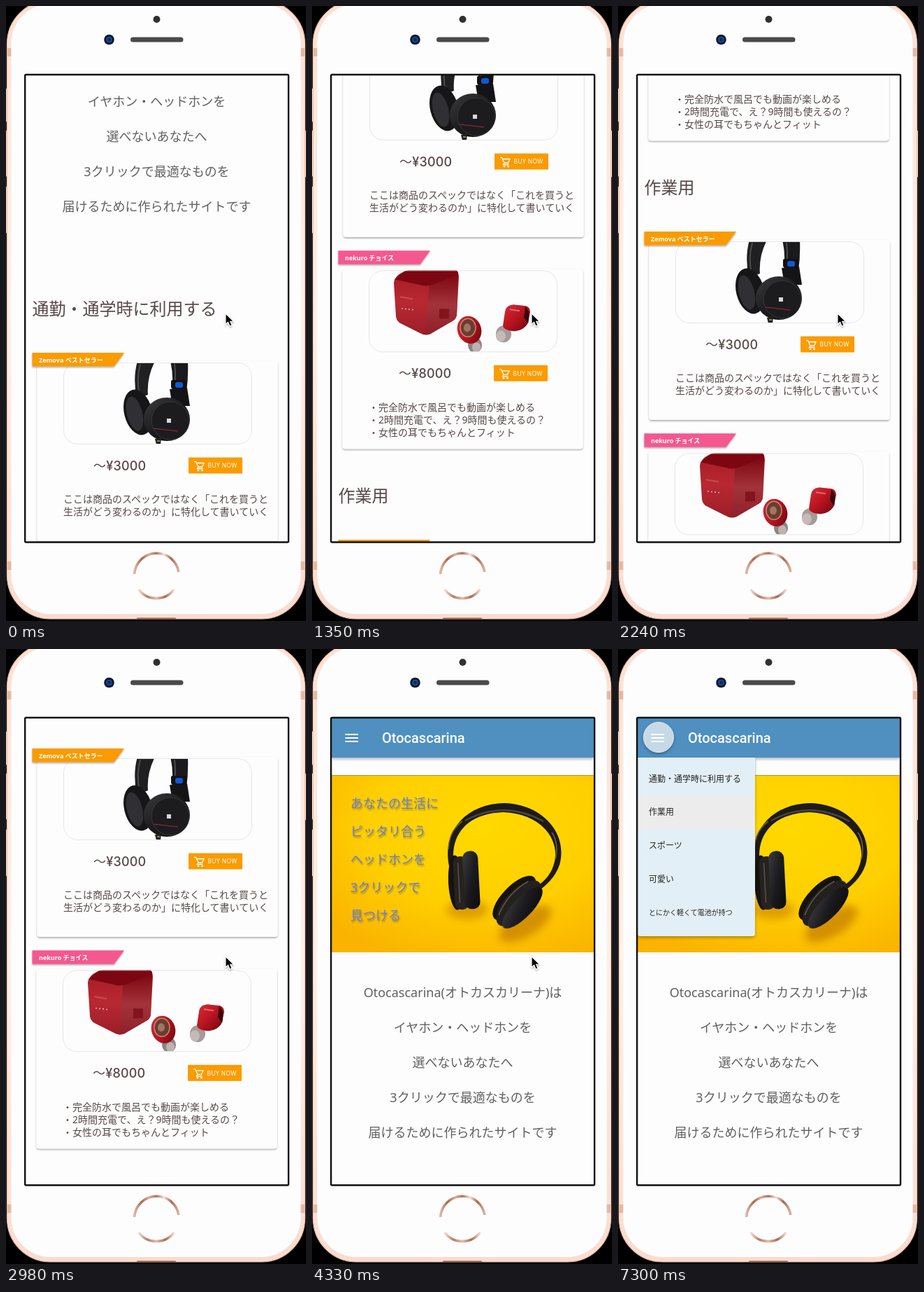
Recreate the animation shown at these times as an HTML page. Size 429 by 878 pixels, loop 8 s.

```html
<!DOCTYPE html>
<html lang="ja">
<head>
<meta charset="utf-8">
<title>Headphone shop on a phone</title>
<style>
  html, body { margin: 0; width: 100%; height: 100%; overflow: hidden; background: #000; }
  svg { display: block; width: 429px; height: 878px; }
  text { font-family: "Noto Sans", "Noto Sans CJK JP", "Noto Sans CJK", sans-serif; white-space: pre; }
  .price { font-family: Inter, "Noto Sans CJK JP", "Noto Sans CJK", sans-serif; font-weight: 500; }
  .title { font-family: Roboto, sans-serif; font-weight: 500; }
</style>
</head>
<body>
<svg id="stage" viewBox="0 0 429 878" xmlns="http://www.w3.org/2000/svg"></svg>
<script>
const LOOP = 8000;
const ORANGE = '#fa9b00', PINK = '#f4588f', INK = '#574848';

// Hard steps: [start ms, value...]
const SCROLL = [
  [0, 404], [150, 440], [300, 510], [450, 585], [600, 645], [750, 692], [900, 728], [1050, 750],
  [1350, 838], [1500, 990], [1650, 1110], [1790, 1180],
  [2240, 1278], [2390, 1372], [2530, 1414], [2980, 1458],
  [4030, 1150], [4180, 350], [4330, 0]
];
const POINTER = [
  [0, 314, 439], [4930, 297, 410], [5080, 240, 310], [5230, 170, 195], [5380, 129, 126],
  [5530, 140, 137], [5820, 132, 134], [5970, 105, 129], [6120, 72, 125], [6260, 56, 124]
];
const MENU_START = 7150, MENU_OPEN = 7300;

const text = (x, cy, size, str, attrs = '') =>
  `<text x="${x}" y="${cy + size * 0.38}" font-size="${size}" ${attrs}>${str}</text>`;
const path = (d, attrs) => `<path d="${d}" ${attrs}/>`;
const rect = (x, y, w, h, attrs) => `<rect x="${x}" y="${y}" width="${w}" height="${h}" ${attrs}/>`;
const oval = (x, y, rx, ry, attrs) => `<ellipse cx="${x}" cy="${y}" rx="${rx}" ry="${ry}" ${attrs}/>`;
const group = (body, attrs) => `<g ${attrs}>${body}</g>`;
const gradient = (id, stops, attrs = '') =>
  `<linearGradient id="${id}" ${attrs}>${stops.map((c, i) =>
    `<stop offset="${i / (stops.length - 1)}" stop-color="${c}"/>`).join('')}</linearGradient>`;
const shadow = (id, dx, dy, blur, opacity) =>
  `<filter id="${id}" x="-20%" y="-30%" width="140%" height="170%">
    <feDropShadow dx="${dx}" dy="${dy}" stdDeviation="${blur}" flood-opacity="${opacity}"/></filter>`;

const defs = `<defs>
  <clipPath id="screen">${rect(28, 99, 375, 666, '')}</clipPath>
  <clipPath id="thumb">${rect(82, 0, 269, 116, 'rx="20"')}</clipPath>
  <radialGradient id="yellow" cx=".58" cy=".3" r=".8">
    <stop offset="0" stop-color="#ffd900"/><stop offset=".55" stop-color="#ffcf00"/>
    <stop offset="1" stop-color="#f9b300"/></radialGradient>
  ${gradient('rim', ['#fbe0d3', '#fff0e8', '#f9dccf'], 'x2="0" y2="1"')}
  ${gradient('copper', ['#e0b9a5', '#a9694f', '#d9ae99', '#b0755b', '#f4e3da', '#a9694f', '#dcb29e'])}
  ${gradient('copper2', ['#f3e0d6', '#b57b60', '#e2bfae', '#a9694f', '#f3e0d6'])}
  ${gradient('cup', ['#3c3c3e', '#1b1b1d', '#0b0b0c'], 'x2="1" y2="1"')}
  ${gradient('redFace', ['#a01a24', '#b92832', '#9c1e28'], 'x2="0" y2="1"')}
  ${gradient('redSide', ['#7d0712', '#a3333a', '#8f2029'], 'x2="0" y2="1"')}
  ${gradient('redBud', ['#d3303a', '#b8131f', '#650810'], 'x2="1" y2="1"')}
  ${shadow('lift', 0, 1.5, 1, 0.35)}
  ${shadow('glow', 0, 2, 2, 0.32)}
  ${shadow('type', 1, 2, 1, 0.35)}
  <filter id="blur" x="-50%" y="-50%" width="200%" height="200%"><feGaussianBlur stdDeviation="6"/></filter>
</defs>`;

function phone() {
  const band = (x, y) => rect(x, y, 6, 12, 'fill="#e3b9a5"');
  const key = (x, y, h) => rect(x, y, 3, h, 'rx="1" fill="#f6d3c3" stroke="#d9a88f" stroke-width=".6"');
  return rect(0, 0, 429, 878, 'fill="#000"') +
    key(-1, 118, 47) + key(-1, 178, 65) + key(-1, 258, 66) + key(427, 178, 66) +
    rect(1.5, -8, 426, 883, 'rx="62" fill="url(#rim)" stroke="#e8bfab" stroke-width="1.2"') +
    band(2, 60) + band(421, 60) + band(2, 793) + band(421, 793) +
    rect(7.5, -3, 414, 871, 'rx="56" fill="#fdfdfd"') +
    rect(187, 873.5, 56, 2.5, 'rx="1" fill="#8a5f4b"') +
    oval(215.5, 19, 5, 5, 'fill="#303030"') +
    oval(147.5, 48, 7.3, 7.3, 'fill="#101a2b"') +
    oval(147.5, 48, 3.4, 3.4, 'fill="#0b2b66" stroke="#1d56ad" stroke-width="1.4"') +
    rect(178, 44.5, 75.5, 7, 'rx="3.5" fill="#4a4a4a"') +
    path('M183.5 811A32 32 0 0 1 247 808', 'fill="none" stroke="url(#copper)" stroke-width="3.6"') +
    path('M189.5 833A32 32 0 0 0 240.5 833', 'fill="none" stroke="url(#copper2)" stroke-width="3.6"');
}

const bars = path('M47.5 122H66M47.5 127H66M47.5 132H66', 'stroke="#fff" stroke-width="1.8"');

function header() {
  return rect(28, 90, 375, 65, 'fill="#4f90c1" filter="url(#glow)"') + bars +
    text(100, 126.8, 20, 'Otocascarina', 'class="title" fill="#fff"');
}

function hero() {
  const lines = ['あなたの生活に', 'ピッタリ合う', 'ヘッドホンを', '3クリックで', '見つける'];
  return rect(28, 180, 375, 253, 'fill="url(#yellow)"') +
    rect(28, 180, 375, 0.8, 'fill="#9c8a20"') +
    oval(222, 372, 30, 14, 'fill="#c47a00" opacity=".55" filter="url(#blur)"') +
    oval(305, 392, 42, 18, 'fill="#b96e00" opacity=".6" filter="url(#blur)" transform="rotate(-30 305 392)"') +
    path('M196 310C186 262 218 221 275 220C332 222 366 265 354 308C348 326 334 338 322 347L319 341C334 330 343 321 347 303C354 270 326 235 274 233C226 234 196 262 203 308Z',
      'fill="#1d1a17"') +
    path('M219 245Q275 215 331 246', 'fill="none" stroke="#4a443c" stroke-width="2.5"') +
    path('M195 286C196 264 205 253 215 246M348 300C352 285 349 270 343 262', 'fill="none" stroke="#6b5f48" stroke-width="1.6"') +
    group(oval(206, 333, 11, 39, 'fill="#15130f"') +
      rect(203, 296, 20, 76, 'rx="9" fill="#26221f"') +
      rect(217, 289, 22, 83, 'rx="10" fill="url(#cup)"') +
      path('M210 305V362', 'stroke="#58534d" stroke-width="1.5"'), 'transform="rotate(-3 215 333)"') +
    group(oval(295, 353, 41, 17, 'fill="#15130f"') +
      oval(294, 363, 42, 19, 'fill="#23201d"') +
      oval(293, 371, 39, 14, 'fill="url(#cup)"') +
      path('M262 354Q294 341 326 351', 'fill="none" stroke="#5b554e" stroke-width="1.6"'),
      'transform="rotate(-46 295 361)"') +
    group(lines.map((s, i) => text(55, 220 + i * 40, 18, s)).join(''), 'fill="#667fd6" filter="url(#type)"');
}

function intro() {
  const lines = ['Otocascarina(オトカスカリーナ)は', 'イヤホン・ヘッドホンを', '選べないあなたへ',
    '3クリックで最適なものを', '届けるために作られたサイトです'];
  return group(lines.map((s, i) => text(215.5, 490 + i * 50, 18, s)).join(''), 'fill="#606060" text-anchor="middle"');
}

// Product pictures; y = 0 is the top of the thumbnail
function headphones() {
  return path('M188 -2H213Q201 22 203 46L187 52Q181 22 188 -2Z', 'fill="#202022"') +
    path('M235 -2H260Q261 20 258 42L237 42Q240 18 235 -2Z', 'fill="#1a1a1c"') +
    path('M192 2Q186 24 191 46M241 2Q243 18 241 32', 'fill="none" stroke="#4a4a4d" stroke-width="2"') +
    oval(189, 71, 20, 33, 'fill="#161618" transform="rotate(-14 189 71)"') +
    oval(184, 73, 11, 25, 'fill="#303034" transform="rotate(-14 184 73)"') +
    path('M234 38L259 36L263 62L238 62Z', 'fill="#141416"') +
    oval(230, 81, 33, 31, 'fill="url(#cup)"') +
    oval(235, 83, 27, 27, 'fill="#1c1c1e" stroke="#38383a"') +
    rect(236, 25, 22, 12, 'rx="2" fill="#111"') +
    rect(242, 28, 11, 8, 'rx="3" fill="#1456d8"') +
    rect(230, 80, 6, 6, 'fill="#d8d8d8"') +
    path('M211 94L246 98', 'stroke="#a52a3c" stroke-width="1.2"') +
    path('M213 109L222 107L221 117H215Z', 'fill="#222"') +
    path('M216 112H220', 'stroke="#b8a13c" stroke-width="1.5"');
}

function earbuds() {
  const dots = [0, 1, 2, 3].map(i => oval(130 + i * 5, 54.5 + i * 0.6, 0.9, 0.9, 'fill="#f3d8d8"')).join('');
  return path('M118 18Q119 8 132 2L150 -3H203Q211 0 211 10L208 64Q207 70 201 73L170 91Q163 94 156 90L128 76Q122 73 121 66Z',
      'fill="url(#redFace)"') +
    path('M119 13L134 1L150 -3H203Q211 0 210 7L176 20Q165 24 156 21Z', 'fill="#7c0611"') +
    path('M168 23L210 6L208 64Q207 70 201 73L170 91L163 92Z', 'fill="url(#redSide)"') +
    path('M127 38L145 41', 'stroke="#c94a53" stroke-width="2"') +
    rect(183, 55, 14, 14, 'fill="#82141d"') + dots +
    oval(234, 107, 10, 11, 'fill="#8d8484"') + oval(236, 110, 6, 7, 'fill="#bcb2b0"') +
    oval(226, 85, 17, 20, 'fill="url(#redBud)" transform="rotate(-20 226 85)"') +
    oval(224, 82, 11, 13, 'fill="#6b3d32" stroke="#c58b73" stroke-width="1.5"') +
    oval(223, 82, 5, 6, 'fill="#a07562"') +
    oval(275, 91, 11, 12, 'fill="#a39a99"') + oval(271, 94, 7, 8, 'fill="#c4bbb9"') +
    path('M277 59Q278 50 289 49L307 51Q313 53 313 60L309 77Q303 86 291 87Q275 86 274 79Z', 'fill="url(#redBud)"') +
    path('M306 52Q314 58 310 76L304 67Z', 'fill="#34080c"') +
    path('M284 56L298 58', 'stroke="#e2666d" stroke-width="2"');
}

function buyButton() {
  return rect(261, 135.5, 77, 23, `rx="1" fill="${ORANGE}"`) +
    path('M269 141.5H271.5L275 149H280.5L283 143.5H273M275 149L273.5 151.5H281.5', 'fill="none" stroke="#fff" stroke-width="1.3"') +
    oval(275, 154, 1.3, 1.3, 'fill="#fff"') + oval(280.5, 154, 1.3, 1.3, 'fill="#fff"') +
    text(288.5, 147.3, 8.4, 'BUY NOW', 'fill="#fff" font-weight="500" letter-spacing=".45"');
}

function card(y, dx, drop, item) {
  const lines = item.lines.map((s, i) => text(82, 195 + i * 18, 14, s)).join('');
  const body = rect(44.5, -2, 344, 257, 'rx="4" fill="#fdfdfd" filter="url(#lift)"') +
    group(item.picture(), 'clip-path="url(#thumb)"') +
    rect(82.5, 0.5, 269, 116, 'rx="20" fill="none" stroke="#e4e4e4" stroke-width=".9"') +
    text(125, 147, 18, '～¥' + item.price, 'class="price" letter-spacing=".2"') + buyButton() + lines;
  const ribbon = path('M37.5 0H169L154.5 19.5H37.5Z', `fill="${item.color}" filter="url(#lift)"`) +
    text(47, 10.5, 9, item.label, 'fill="#fff" font-weight="600"');
  return group(body, `transform="translate(${dx} ${y + drop})" fill="${INK}"`) +
    group(ribbon, `transform="translate(0 ${y})"`);
}

const ITEMS = [
  { label: 'Zemova ベストセラー', color: ORANGE, price: 3000, picture: headphones,
    lines: ['ここは商品のスペックではなく「これを買うと', '生活がどう変わるのか」に特化して書いていく'] },
  { label: 'nekuro チョイス', color: PINK, price: 8000, picture: earbuds,
    lines: ['・完全防水で風呂でも動画が楽しめる', '・2時間充電で、え？9時間も使えるの？', '・女性の耳でもちゃんとフィット'] }
];

function section(y, name) {
  return text(37.5, y, 24, name, `fill="${INK}"`) +
    card(y + 63, 0, 14, ITEMS[0]) + card(y + 351.3, -1, 28, ITEMS[1]);
}

function menu() {
  const names = ['通勤・通学時に利用する', '作業用', 'スポーツ', '可愛い', 'とにかく軽くて電池が持つ'];
  return path('M28 155H196V406Q196 410 192 410H32Q28 410 28 406Z', 'fill="#e3eff6" filter="url(#glow)"') +
    rect(28, 210, 168, 48, 'fill="#ececec"') +
    names.map((s, i) => text(44, 185 + i * 47.9, i < 4 ? 12 : 10, s, 'fill="#222"')).join('');
}

const stage = document.getElementById('stage');
stage.innerHTML = defs + phone() +
  group(rect(28, 99, 375, 666, 'fill="#fdfdfd"') +
    group(hero() + header() + intro() + section(836, '通勤・通学時に利用する') + section(1537, '作業用'), 'id="page"') +
    group(oval(58, 126, 21.5, 21.5, 'fill="#c6d9e6" stroke="#dde9f0" filter="url(#glow)"') + bars, 'id="press"') +
    group(menu(), 'id="menu"'), 'clip-path="url(#screen)"') +
  rect(27.2, 98, 376.8, 667.5, 'rx="1.5" fill="none" stroke="#111" stroke-width="2.4"') +
  group(path('M0 0V15.5L3.6 12.2L6 18L9 16.8L6.6 11.2H11.3Z',
    'fill="#000" stroke="#fff" stroke-width="1.1" filter="url(#lift)"'), 'id="pointer"');

const [page, press, menuBox, pointer] = ['page', 'press', 'menu', 'pointer'].map(id => document.getElementById(id));
const stepAt = (track, t) => track.reduce((last, step) => step[0] <= t ? step : last);
const show = (el, on) => el.setAttribute('visibility', on ? 'visible' : 'hidden');

function draw(t) {
  const [, scroll] = stepAt(SCROLL, t);
  const [, x, y] = stepAt(POINTER, t);
  const pressed = t >= MENU_START, open = t >= MENU_OPEN;
  page.setAttribute('transform', `translate(0 ${-scroll})`);
  pointer.setAttribute('transform', `translate(${x} ${y})`);
  show(pointer, !pressed);
  show(press, pressed);
  show(menuBox, pressed);
  menuBox.setAttribute('opacity', open ? 1 : 0.6);
  menuBox.setAttribute('transform', open ? '' : 'translate(28 155) scale(.85) translate(-28 -155)');
}

const start = performance.now();
function tick() {
  draw((performance.now() - start) % LOOP);
  requestAnimationFrame(tick);
}
tick();
</script>
</body>
</html>
```
